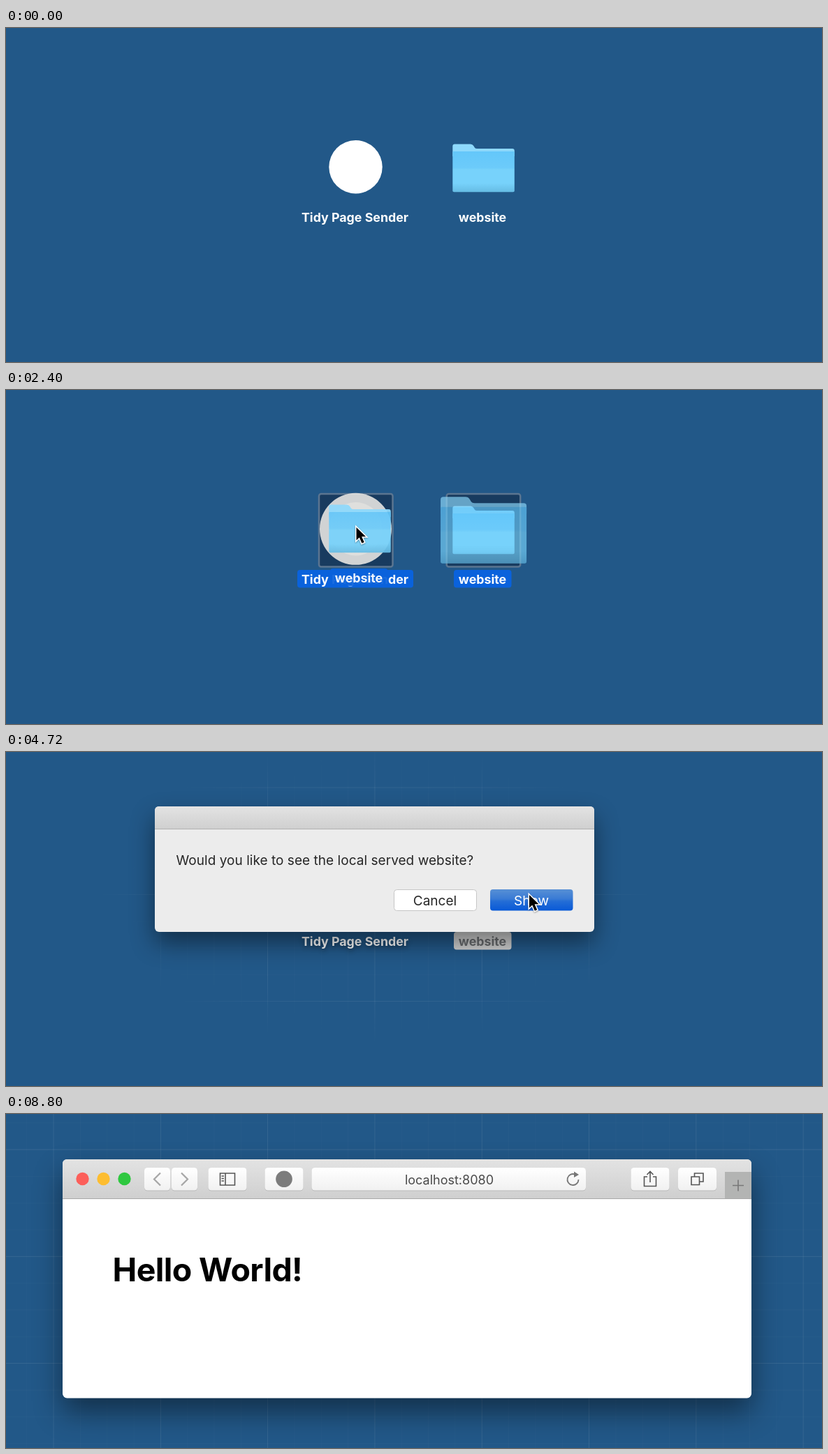
An HTML page that plays this animation: 1168x479 px, repeating every 9.12 s.

```html
<!DOCTYPE html>
<html lang="en">
<head>
<meta charset="utf-8">
<title>Serving a folder</title>
<style>
  html, body { margin: 0; width: 100%; height: 100%; overflow: hidden; background: #225888; }
  svg { display: block; width: 100%; height: 100%; }
  text { font-family: Inter, "Open Sans", sans-serif; text-anchor: middle; }
  .label { font-size: 17.8px; font-weight: 700; fill: #fff; }
  .ui { font-size: 19px; letter-spacing: .04px; fill: #262626; }
  .left { text-anchor: start; }
  .heading { font-size: 46.5px; font-weight: 700; letter-spacing: -.6px; }
  .address { font-size: 18px; fill: #4a4a4a; }
  .frame { fill: #183b5f; stroke: #5b7590; stroke-width: 2.5; }
  .pill { fill: #0a62dc; }
  .icon { fill: none; stroke: #555; stroke-width: 1.6; }
  .pale { stroke: #a6a6a6; stroke-width: 2.2; }
  #dialogBox { filter: drop-shadow(0 16px 17px rgba(0, 0, 0, .45)); }
  #browserBox { filter: drop-shadow(0 20px 20px rgba(0, 0, 0, .45)); }
  .lifted { filter: drop-shadow(0 3px 3px rgba(0, 0, 0, .4)); }
  #arrow { filter: drop-shadow(0 1.5px 1px rgba(0, 0, 0, .35)); }
</style>
</head>
<body>
<svg viewBox="0 0 1168 479">
  <defs>
    <linearGradient id="folderFront" x2="0" y2="1">
      <stop offset="0" stop-color="#64c7fa"/><stop offset=".4" stop-color="#6ccbfa"/>
      <stop offset=".45" stop-color="#77d2fb"/><stop offset=".78" stop-color="#77d2fb"/>
      <stop offset="1" stop-color="#66bce4"/>
    </linearGradient>
    <linearGradient id="bar" x2="0" y2="1">
      <stop offset="0" stop-color="#e3e3e3"/><stop offset="1" stop-color="#cfcfcf"/>
    </linearGradient>
    <linearGradient id="key" x2="0" y2="1">
      <stop offset="0" stop-color="#fff"/><stop offset="1" stop-color="#f1f1f1"/>
    </linearGradient>
    <linearGradient id="blue" x2="0" y2="1">
      <stop offset="0" stop-color="#67a9fa"/><stop offset=".45" stop-color="#4390fb"/>
      <stop offset=".55" stop-color="#2b81fc"/><stop offset="1" stop-color="#0a69fd"/>
    </linearGradient>
    <radialGradient id="spot" gradientUnits="userSpaceOnUse" cx="528" cy="204" r="400"
      gradientTransform="translate(0 92) scale(1 .55)">
      <stop offset=".65" stop-color="#fff"/><stop offset="1" stop-color="#000"/>
    </radialGradient>
    <mask id="spotMask"><path fill="url(#spot)" d="M0 0H1168V479H0z"/></mask>
    <g id="folder">
      <path fill="#8ed9fc" d="M639.3 169.5q0-3 3-3h22.500q3 0 4.500 2.500l1.500 2.500q1 1.500 3.500 1.500h50.500q3 0 3 3v8h-88.500z"/>
      <path fill="url(#folderFront)" d="M639.3 178q0-1 1-1h86.500q1 0 1 1v55.300q0 2-2 2h-84.500q-2 0-2-2z"/>
    </g>
    <circle id="disc" cx="500.5" cy="199.3" r="38.2"/>
  </defs>

  <g id="grid" fill="none" stroke="#fff"></g>

  <rect id="appFrame" class="frame" x="448" y="149" width="105.5" height="104.5" rx="3"/>
  <g id="app">
    <use id="appDisc" href="#disc"/>
    <rect id="appPill" class="pill" x="417" y="258" width="166" height="25.5" rx="4"/>
    <text class="label" x="499.5" y="277.5">Tidy Page Sender</text>
  </g>

  <rect id="siteFrame" class="frame" x="630.7" y="149" width="105.5" height="104.5" rx="3"/>
  <use href="#folder"/>
  <rect id="greyPill" x="641" y="258" width="82.5" height="25.5" rx="4" fill="#d1d2d2"/>
  <rect id="sitePill" class="pill" x="641" y="258" width="82.5" height="25.5" rx="4"/>
  <text id="siteLabel" class="label" x="682" y="277.5">website</text>

  <use id="zoomDisc" href="#disc" fill="#e0e0de"/>
  <use id="zoomFolder" href="#folder"/>

  <g id="drag">
    <use href="#folder"/>
    <rect class="pill" x="641" y="258" width="82.5" height="25.5" rx="4"/>
    <text class="label" x="682" y="277.5">website</text>
  </g>

  <g id="dialog">
    <g id="dialogBox">
      <rect x="213" y="78" width="629" height="180" rx="6" fill="#ececec"/>
      <path fill="url(#bar)" d="M213 110.500V84q0-6 6-6H836q6 0 6 6V110.500z"/>
    </g>
    <path stroke="#b2b2b2" d="M213 110.500H842"/>
    <text class="ui left" x="243.500" y="162">Would you like to see the local served website?</text>
    <rect x="555.500" y="197.500" width="118" height="30" rx="4" fill="#fff" stroke="#c6c6c6"/>
    <text class="ui" x="614" y="219.500">Cancel</text>
    <rect id="show" x="693" y="197" width="118.500" height="30.500" rx="4" fill="url(#blue)"/>
    <text class="ui" x="752" y="219.500" style="fill:#fff">Show</text>
  </g>

  <g id="browser">
    <rect id="browserBox" x="81" y="65" width="986" height="342.500" rx="6.500" fill="#fff"/>
    <path fill="url(#bar)" d="M81 121.500V71.500q0-6.500 6.500-6.500H1060.500q6.500 0 6.500 6.500V121.500z"/>
    <path fill="#b3b4b3" d="M1029 83H1067V121H1029z"/>
    <path stroke="#a9a9a9" d="M81 121.500H1067"/>
    <g id="lights"></g>
    <g id="keys"></g>
    <g class="icon">
      <path class="pale" d="M221 84.500l-9 9 9 9M251 84.500l9 9-9 9"/>
      <path d="M306.500 85h21v17h-21zM314 85v17M308.500 89h3.500m-3.500 3.500h3.500m-3.500 3.500h3.500"/>
      <path d="M918 90h-4.500v13.500h17V90H926M922 98V82.500m-4.500 4.500 4.500-4.500 4.500 4.500"/>
      <path d="M981 90h11.500v11.500H981zM985.500 90v-5H998v12h-5.500"/>
      <path stroke="#777" d="M1040 102.500h16M1048 94.500v16"/>
      <path stroke="#777" stroke-width="1.800" d="M819.500 94a8 8 0 1 1-5-7.400"/>
    </g>
    <path fill="#777" d="M813 82.500l7 4.500-7 4z"/>
    <circle cx="398" cy="93.300" r="11.800" fill="#7c7c7c"/>
    <g id="page">
      <text class="address" x="634.500" y="100.500">localhost:8080</text>
      <text class="heading left" x="152.500" y="240">Hello World!</text>
    </g>
  </g>

  <path id="arrow" fill="#000" stroke="#fff" stroke-width="3" paint-order="stroke"
    d="M0 0V18.500l4.300-4.100 3.600 8.300 3.300-1.400-3.600-8.100H13.500z"/>
</svg>

<script>
const LOOP = 9120, STEP = 80;
const GRAB = { x: 678.5, y: 199 };
const $ = id => document.getElementById(id);
const fade = (id, value) => $(id).setAttribute('opacity', value);
const place = (id, value) => $(id).setAttribute('transform', value);
const zoomAt = (x, y, s) => `translate(${x} ${y}) scale(${s}) translate(${-x} ${-y})`;

// Linear value along a list of [time, value] points.
function track(t, points) {
  if (t <= points[0][0]) return points[0][1];
  for (let i = 1; i < points.length; i++) {
    const [t0, v0] = points[i - 1], [t1, v1] = points[i];
    if (t < t1) return v0 + (v1 - v0) * (t - t0) / (t1 - t0);
  }
  return points.at(-1)[1];
}
const ramp = (t, from, to) => Math.min(1, Math.max(0, (t - from) / (to - from)));
const smooth = p => p * p * (3 - 2 * p);

function gridPath(gap, x, y) {
  let d = '';
  for (; x < 1168; x += gap) d += `M${x} 0V479`;
  for (; y < 479; y += gap) d += `M0 ${y}H1168`;
  return d;
}
$('grid').innerHTML =
  `<path opacity=".025" d="${gridPath(38.33, 29.7, 12.7)}"/>` +
  `<path opacity=".07" d="${gridPath(153.3, 68, 51)}"/>`;

$('lights').innerHTML = ['#fc5f5a', '#fdbd30', '#2fc840']
  .map((c, i) => `<circle cx="${109.5 + 30 * i}" cy="93" r="9.2" fill="${c}"/>`).join('');

$('keys').innerHTML = [[198, 37], [237, 37], [289.5, 55], [370.5, 55], [437.5, 392.5], [894.5, 55], [962, 55]]
  .map(([x, w]) => `<rect x="${x}" y="77.5" width="${w}" height="33" rx="4.500" fill="#b9b9b9"/>` +
    `<rect x="${x}" y="77" width="${w}" height="32.500" rx="4.500" fill="url(#key)"/>`).join('');

function cursorAt(t) {
  if (t < 1280) return [
    track(t, [[160, 1133], [400, 857], [560, 750], [720, 700], [960, 680], [1040, GRAB.x]]),
    track(t, [[160, 202], [800, GRAB.y]])
  ];
  const drag = smooth(ramp(t, 1280, 2160)), move = smooth(ramp(t, 3920, 4640));
  return [GRAB.x - 177 * drag + 247.5 * move, GRAB.y - 2 * drag + 8 * move];
}

function render(t) {
  const [x, y] = cursorAt(t);
  place('arrow', `translate(${x} ${y})`);
  fade('arrow', t >= 160 && t < 8320 ? 1 : 0);

  const selected = t >= 1280, release = ramp(t, 2720, 3040);
  const hover = selected && x < 554 ? 1 - release : 0;
  fade('appFrame', hover);
  fade('appPill', hover);
  $('appDisc').setAttribute('fill', hover > .5 ? '#d4d4d2' : '#fff');
  $('app').setAttribute('class', t >= 3040 ? 'lifted' : '');
  fade('siteFrame', selected ? 1 : 0);
  fade('sitePill', selected ? 1 - release : 0);
  fade('greyPill', release);
  $('siteLabel').style.fill = release > .5 ? '#6a6d70' : '#fff';

  place('drag', `translate(${x - GRAB.x} ${y - GRAB.y})`);
  fade('drag', selected ? .93 * (1 - ramp(t, 2400, 2640)) : 0);

  const scale = track(t, [[2320, 1.03], [2400, 1.39], [2560, 2.16]]);
  const glow = t < 2320 ? 0 : track(t, [[2320, .8], [2400, .66], [2640, 0]]);
  place('zoomDisc', zoomAt(500.5, 199.3, scale * .97));
  place('zoomFolder', zoomAt(683.5, 200.5, scale));
  fade('zoomDisc', Math.min(1, glow * 1.4));
  fade('zoomFolder', glow);

  const open = ramp(t, 3280, 3600);
  fade('dialog', open * (1 - ramp(t, 4800, 5040)));
  place('dialog', zoomAt(527.5, 168, .92 + .08 * open));
  $('show').style.filter = t >= 4640 ? 'brightness(.85)' : '';

  const launch = ramp(t, 5440, 5840);
  fade('browser', launch);
  place('browser', zoomAt(574, 236, .9 + .1 * smooth(launch)));
  fade('page', ramp(t, 5840, 6080));

  fade('grid', t < 3360 ? 0 : 1);
  $('grid').setAttribute('mask', t < 5520 ? 'url(#spotMask)' : 'none');
}

function tick() {
  const t = performance.now() % LOOP;
  render(Math.floor(t / STEP) * STEP);
  requestAnimationFrame(tick);
}
tick();
</script>
</body>
</html>
```
